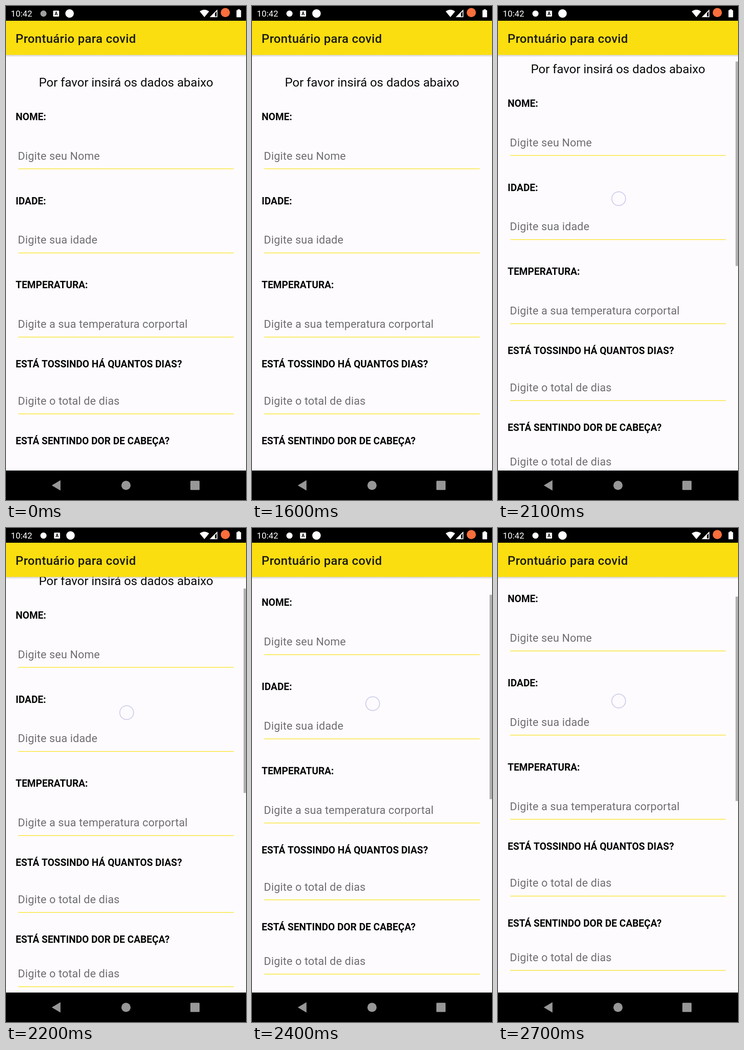
An HTML page with a canvas for the animation above (3100 ms loop, 522 by 1073 pixels).

```html
<!DOCTYPE html>
<html lang="pt">
<head>
<meta charset="utf-8">
<style>
html, body { margin: 0; width: 100%; height: 100%; overflow: hidden; background: #000; }
canvas { display: block; width: 522px; height: 1073px; }
</style>
</head>
<body>
<canvas id="stage" width="522" height="1073"></canvas>
<script>
const ctx = document.getElementById('stage').getContext('2d');
const W = 522, LOOP = 3100;
const BAR_TOP = 32, PAGE_TOP = 106.3, PAGE_END = 1009;

// Each pose holds until the next: [start ms, scroll, finger y]
const poses = [
  [0, 0, null],
  [1800, 0, 449],
  [1900, 4, 442],
  [2000, 15, 431],
  [2100, 29, 418.5],
  [2200, 51, 401],
  [2300, 70.6, 385],
  [2400, 78.4, 381.5],
  [2600, 78.4, 381.3],
  [2700, 86.5, 375.8]
];

// [label, label baseline, hint, hint baseline, underline y]
const fields = [
  ['NOME:', 247.7, 'Digite seu Nome', 333.5, 353.6],
  ['IDADE:', 430.5, 'Digite sua idade', 516.3, 536.4],
  ['TEMPERATURA:', 613.2, 'Digite a sua temperatura corportal', 699, 719.1],
  ['ESTÁ TOSSINDO HÁ QUANTOS DIAS?', 785.2, 'Digite o total de dias', 865.9, 886],
  ['ESTÁ SENTINDO DOR DE CABEÇA?', 952, 'Digite o total de dias', 1027.3, 1047.4]
];

function rect(x, y, w, h, color) {
  ctx.fillStyle = color;
  ctx.fillRect(x, y, w, h);
}

function disc(x, y, r, color) {
  ctx.fillStyle = color;
  ctx.beginPath();
  ctx.arc(x, y, r, 0, Math.PI * 2);
  ctx.fill();
}

function polygon(points, color) {
  ctx.fillStyle = color;
  ctx.beginPath();
  points.forEach(([x, y]) => ctx.lineTo(x, y));
  ctx.fill();
}

function text(str, x, y, size, weight, color, spacing = 0, align = 'left') {
  ctx.font = `${weight} ${size}px Roboto, sans-serif`;
  ctx.letterSpacing = spacing + 'px';
  ctx.textAlign = align;
  ctx.fillStyle = color;
  ctx.fillText(str, x, y);
}

function drawStatusBar(settled) {
  const shift = settled ? 0 : -2;
  rect(0, 0, W, BAR_TOP, '#000');
  text('10:42', 10.6, 23.3, 18.6, 400, '#fff');
  disc(81.5, 16.5, 6.7, settled ? '#fff' : '#a0a0a0');

  ctx.fillStyle = '#fff';
  ctx.beginPath();
  ctx.roundRect(104.5 + shift, 10, 13, 13, 1.5);
  ctx.fill();
  text('A', 111 + shift, 20, 10, 700, '#000', 0, 'center');
  disc(140.3 + shift, 16.3, 9.2, '#fff');

  // Wi-Fi fan
  ctx.fillStyle = '#fff';
  ctx.beginPath();
  ctx.moveTo(431.5, 24.3);
  ctx.lineTo(421.3, 11.8);
  ctx.quadraticCurveTo(431.5, 4.2, 441.7, 11.8);
  ctx.fill();

  // Mobile signal
  polygon([[443, 24.3], [459.7, 24.3], [459.7, 7.5]], '#fff');
  polygon([[454.5, 22.5], [458, 22.5], [458, 12], [454.5, 15.5]], '#000');

  disc(477, 14.3, 10, '#fa6f3c');

  // Battery
  rect(503.8, 7.2, 5, 3, '#fff');
  ctx.beginPath();
  ctx.roundRect(501.3, 9, 10, 15.6, 1.2);
  ctx.fill();
}

function drawToolbar() {
  rect(0, BAR_TOP, W, PAGE_TOP - BAR_TOP, '#fade10');
  const shadow = ctx.createLinearGradient(0, PAGE_TOP, 0, PAGE_TOP + 5);
  shadow.addColorStop(0, 'rgba(0,0,0,.16)');
  shadow.addColorStop(1, 'rgba(0,0,0,0)');
  rect(0, PAGE_TOP, W, 5, shadow);
  text('Prontuário para covid', 20.8, 79.8, 26.6, 500, '#1d1b10', 0.33);
}

function drawPage(scroll) {
  ctx.save();
  ctx.beginPath();
  ctx.rect(0, PAGE_TOP, W, PAGE_END - PAGE_TOP);
  ctx.clip();
  ctx.translate(0, -scroll);
  text('Por favor insirá os dados abaixo', W / 2, 175.2, 26.6, 400, '#0a0a0a', 0, 'center');
  for (const [label, labelY, hint, hintY, lineY] of fields) {
    text(label, 21, labelY, 21.27, 700, '#050505');
    text(hint, 25.8, hintY, 23.93, 400, '#6f6e71', 0.18);
    rect(26.5, lineY - 0.7, 469, 1.4, '#f8e423');
  }
  ctx.restore();
  if (scroll > 0) rect(516.7, PAGE_TOP + scroll * 0.494, 5.3, 444, '#b1afb2');
}

function drawNavigation() {
  const gray = '#979797';
  rect(0, PAGE_END, W, 64, '#000');
  polygon([[99.5, 1041.3], [118.5, 1030], [118.5, 1052.6]], gray);
  disc(261, 1041.3, 10, gray);
  ctx.beginPath();
  ctx.roundRect(401, 1031.3, 20, 20, 1.5);
  ctx.fill();
}

function drawFinger(y) {
  ctx.strokeStyle = '#d0d0ea';
  ctx.lineWidth = 2;
  ctx.beginPath();
  ctx.arc(262.5, y, 15, 0, Math.PI * 2);
  ctx.stroke();
}

function render(now) {
  const time = now % LOOP;
  const [, scroll, finger] = poses.findLast(([start]) => start <= time);
  rect(0, 0, W, 1073, '#fefbff');
  drawPage(scroll);
  drawToolbar();
  drawStatusBar(time >= 100);
  drawNavigation();
  if (finger !== null) drawFinger(finger);
}

const begin = performance.now();
function tick() {
  render(performance.now() - begin);
  requestAnimationFrame(tick);
}
tick();
</script>
</body>
</html>
```
